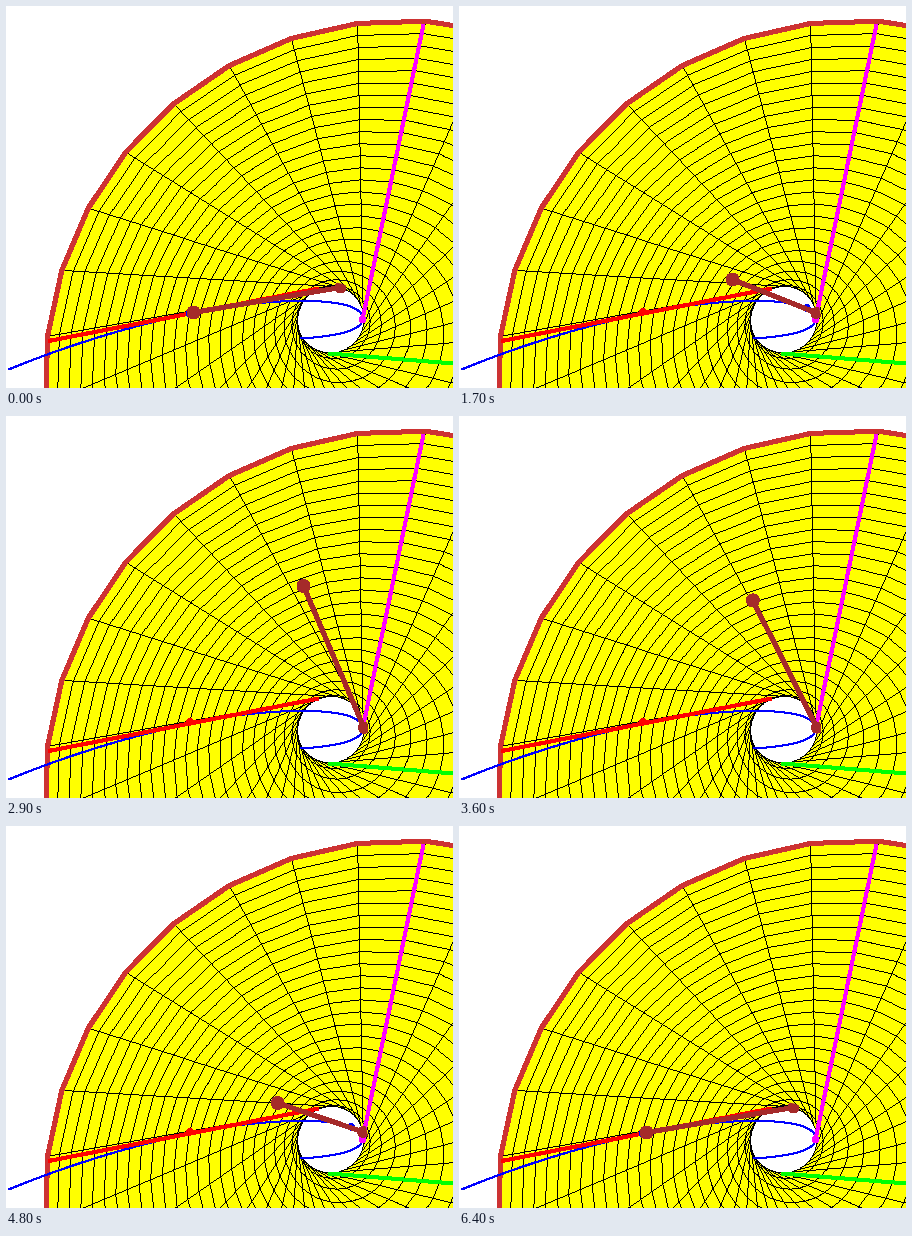
These frames come from a looping animation (447 by 382 pixels, 6500 ms). A matplotlib script:

```python
import numpy as np
import matplotlib.pyplot as plt
from matplotlib.animation import FuncAnimation
from matplotlib.patches import Circle, Polygon

W, H, DPI = 447, 382, 100
FRAMES, HALF = 65, 32
BROWN = "#a52a2a"

RULINGS, RINGS = 33, 24
WAIST, WAIST_R = np.array([324, 313]), 33.5
RIM, RIM_R = np.array([396.8, 372.3]), 358.3


def on_circle(center, radius, deg):
    a = np.radians(deg)
    return center + radius * np.stack([np.cos(a), -np.sin(a)], axis=-1)


def bezier(points, t):
    """Point or points of a Bezier curve, by repeated interpolation."""
    t = np.asarray(t)[..., None]
    points = [np.array(p, float) for p in points]
    while len(points) > 1:
        points = [a + (b - a) * t for a, b in zip(points, points[1:])]
    return points[0]


fig = plt.figure(figsize=(W / DPI, H / DPI), dpi=DPI, facecolor="white")
ax = fig.add_axes([0, 0, 1, 1])
ax.axis("off")


def stroke(points, color, width, z):
    x, y = np.asarray(points).T
    return ax.plot(x, y, color=color, lw=width * 72 / DPI, zorder=z,
                   antialiased=False, solid_capstyle="butt")[0]


def dot(center, radius, color, z):
    return ax.add_patch(Circle(center, radius, fc=color, ec="none", zorder=z,
                               antialiased=False))


# Ruled surface between the waist circle and the rim
k = np.arange(RULINGS + 1)
angle = 173.2 - 360 / RULINGS * k + 0.5 * np.sin(2 * np.pi * k / RULINGS)
outer = on_circle(RIM, RIM_R, angle)
inner = on_circle(WAIST, WAIST_R, angle - 84.7)
rings = [outer + (inner - outer) * j / RINGS for j in range(1, RINGS + 1)]

ax.add_patch(Polygon(outer, fc="#ffff00", ec="none", zorder=1))
ax.add_patch(Polygon(inner, fc="white", ec="none", zorder=1.5))

# Hairlines of the mesh, exactly one pixel thick
mesh = np.zeros((H, W, 4))


def hairline(a, b):
    n = int(np.abs(b - a).max()) + 1
    x, y = np.rint(np.linspace(a, b, n + 1)).astype(int).T
    ok = (x >= 0) & (x < W) & (y >= 0) & (y < H)
    mesh[y[ok], x[ok]] = 0, 0, 0, 1


for a, b in zip(outer, inner):
    hairline(a, b)
for ring in rings:
    for a, b in zip(ring, ring[1:]):
        hairline(a, b)
ax.imshow(mesh, interpolation="nearest", aspect="auto", zorder=2)
ax.set_xlim(-0.5, W - 0.5)
ax.set_ylim(H - 0.5, -0.5)
stroke(outer, "#cd3333", 4, 3)

# Curve traced by the marked point: lead-in, travelled part, tail
PATH = [(183, 307), (250, 292.5), (350, 287), (356, 310)]
t = np.linspace(0, 1, 80)
for part in ([(2, 363), (90, 327), PATH[0]], PATH,
             [PATH[-1], (360, 328), (294, 332)]):
    stroke(bezier(part, t), "#0000ff", 1, 4)

# Fixed generators
stroke([(42, 334.5), (312, 282)], "#ff0000", 3, 5)
stroke([(417, 18), (356, 313)], "#ff00ff", 3, 5)
stroke([(322, 347), (450, 357.2)], "#00ff00", 3, 5)
dot((183.5, 305.5), 3.2, "#ff0000", 5)
dot((356, 313), 3.5, "#ff00ff", 5)

# Moving rod
mark = dot((0, 0), 3.3, "#0000ff", 6)
rod = stroke([(0, 0), (1, 1)], BROWN, 4, 7)
tip = dot((0, 0), 6.4, BROWN, 8)
foot = dot((0, 0), 5.4, BROWN, 8)
foot.set_clip_path(Circle(WAIST, 37.5, transform=ax.transData))


def pose(u):
    """Tip, foot and marked point, for u from 0 (red) to 1 (turning point)."""
    a = (np.polyval([186.6, -128.8, -218.6, 286.4, 187], u),
         np.polyval([-337.5, 249.4, -99.4, 306], u))
    b = on_circle(WAIST, WAIST_R, 3 + 70 * (1 - u) ** 2.8)
    m = bezier(PATH, 1 - (1 - u) ** 2.5)
    return a, b, m


def update(n):
    a, b, m = pose(1 - abs(HALF - n) / HALF)
    rod.set_data([a[0], b[0]], [a[1], b[1]])
    tip.center, foot.center, mark.center = tuple(a), tuple(b), tuple(m)
    return mark, rod, tip, foot


anim = FuncAnimation(fig, update, frames=FRAMES, interval=100,
                     repeat=True, repeat_delay=0, blit=False)
plt.show()
```
